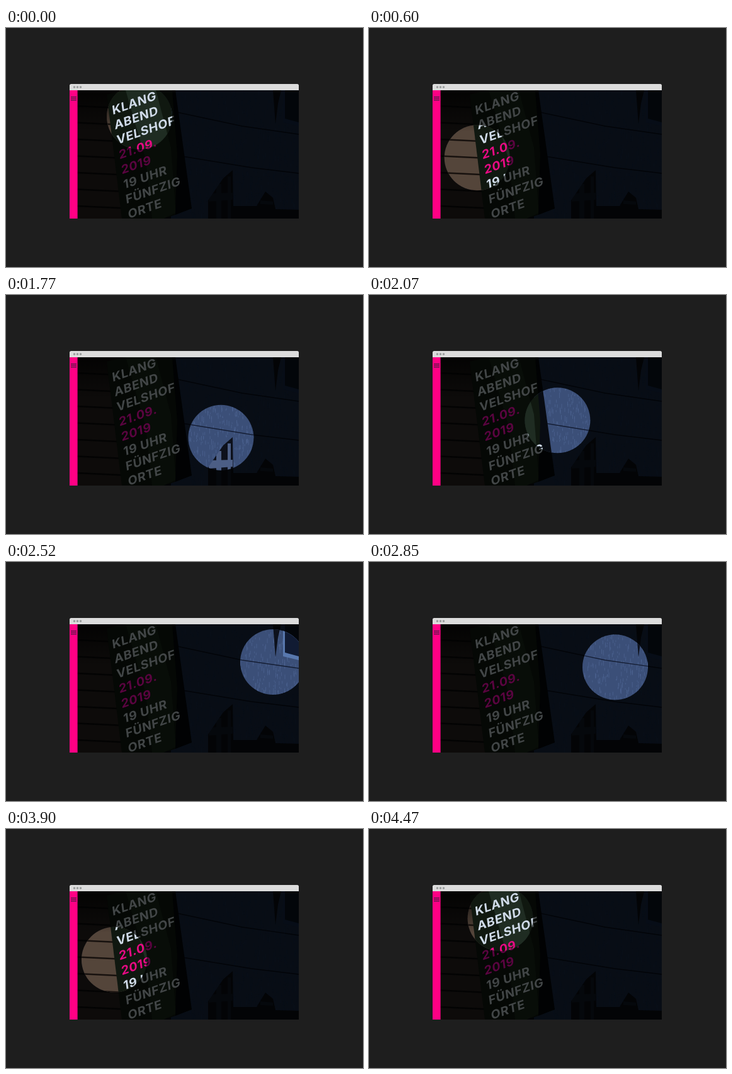
Write an HTML page that moves like this. It is 567x380 px and loops after 4500 ms.

```html
<!DOCTYPE html>
<html lang="de">
<head>
<meta charset="utf-8">
<title>Spotlight</title>
<style>
  html, body { margin: 0; width: 100%; height: 100%; overflow: hidden; background: #1e1e1e; }
  svg { display: block; }
  .dim {
    --wood: #0d0b0a; --gap: #030303; --wall: #080d15; --grain: #0a111a; --seam: #020408;
    --hole: #030406; --post: #05080c; --pane: #03060a; --frame: #070d17;
    --poster: #050805; --fold: #080d08; --edge: #010203; --text: #424647; --pink: #5a0440;
  }
  .lit {
    --wood: #54453a; --gap: #17110e; --wall: #3b4f78; --grain: #4f6694; --seam: #141d33;
    --hole: #0d111c; --post: #4c5e85; --pane: #111b33; --frame: #5878ae;
    --poster: #101810; --fold: #1f2c22; --edge: #080b12; --text: #d0dbe9; --pink: #e80a84;
  }
  .seam, .gap, .grain { fill: none; stroke: var(--seam); stroke-width: 1.3; }
  .gap { stroke: var(--gap); stroke-width: 2.6; }
  .grain { stroke: var(--grain); stroke-width: .7; }
  #lines { font: 700 19px Inter, Arial, sans-serif; letter-spacing: .03em; }
</style>
</head>
<body>
<svg width="567" height="380" viewBox="0 0 567 380">
  <defs>
    <clipPath id="photo"><path d="M113 99H465V303H113Z"/></clipPath>
    <clipPath id="spot"><circle id="light" r="52"/></clipPath>
    <clipPath id="boards">
      <path id="wall" d="M262 99H465V289L428 288 424 270 412 260 398 283 361 283 360 226 345 239 321 274V303H262Z"/>
    </clipPath>
    <linearGradient id="shade" x2="0" y2="1">
      <stop stop-opacity=".75"/><stop offset="1" stop-opacity="0"/>
    </linearGradient>
    <g id="scene">
      <path fill="var(--hole)" d="M113 99H465V303H113Z"/>
      <path fill="var(--wood)" d="M113 99H200V303H113Z"/>
      <path class="gap" id="planks"/>
      <path fill="url(#shade)" d="M113 99H200V165H113Z"/>
      <path fill="var(--post)" d="M322 263l38-1v11l-38 3zM334 248h8v55h-8zM352 236h5v67h-5zM404 274l20 2v5l-20-1z"/>
      <use href="#wall" fill="var(--wall)"/>
      <path class="grain" id="grain" clip-path="url(#boards)"/>
      <path class="seam" d="M272 134L375 156 465 169M280 204L390 222 465 231"/>
      <path fill="var(--hole)" d="M424 99H437L432 120 428 152Z"/>
      <path fill="var(--frame)" d="M440 99H465V156L440 150Z"/>
      <path fill="var(--pane)" d="M443 99H465V150L443 144Z"/>
      <path fill="var(--poster)" d="M160 106L188 99H268L294 287 266 298 250 303H184Z"/>
      <path fill="var(--fold)" d="M190 99L238 99 262 190 270 294 250 303 232 303 222 210Z"/>
      <path fill="var(--edge)" d="M264 99H269L295 287 269 297 272 200Z"/>
      <g id="lines"></g>
    </g>
  </defs>

  <rect width="567" height="380" fill="#1e1e1e"/>
  <path fill="#dcdcdc" d="M101 99V91.500a2.500 2.500 0 0 1 2.500-2.500H462.500a2.500 2.500 0 0 1 2.500 2.500V99Z"/>
  <path stroke="#999c9c" stroke-width="3.600" stroke-linecap="round" d="M108.500 94h0M113.500 94h0M118.500 94h0"/>
  <g clip-path="url(#photo)">
    <use href="#scene" class="dim"/>
    <g clip-path="url(#spot)"><use href="#scene" class="lit"/></g>
  </g>
  <path fill="#ff0084" d="M101 99H113.600V303H101Z"/>
  <path stroke="#4c1a44" stroke-width="1.200" d="M103 109.700h9M103 112.200h9M103 114.700h9"/>
</svg>
<script>
  const LOOP = 4500;
  const byId = id => document.getElementById(id);

  const lines = ['KLANG', 'ABEND', 'VELSHOF', '21.09.', '2019', '19 UHR', 'FÜNFZIG', 'ORTE'];
  lines.forEach((line, i) => {
    const el = document.createElementNS('http://www.w3.org/2000/svg', 'text');
    el.textContent = line;
    el.setAttribute('transform', `matrix(1 -.35 .13 1 ${169.5 + 3.6 * i} ${138 + 23.6 * i})`);
    el.setAttribute('fill', /^2/.test(line) ? 'var(--pink)' : 'var(--text)');
    byId('lines').append(el);
  });

  let planks = '';
  for (let y = 124; y < 303; y += 26.5) planks += `M113 ${y}l85 4`;
  byId('planks').setAttribute('d', planks);

  let seed = 7;
  const random = () => (seed = seed * 16807 % 2147483647) / 2147483647;
  let grain = '';
  for (let i = 0; i < 900; i++) {
    const x = 262 + random() * 203, y = 99 + random() * 204;
    grain += `M${x.toFixed(1)} ${y.toFixed(1)}v${(2 + random() * 7).toFixed(1)}`;
  }
  byId('grain').setAttribute('d', grain);

  // Turning points of the spotlight: time, x, y
  const path = [
    [0, 212, 141], [270, 383, 252], [525, 155, 195], [800, 280, 255], [1110, 411, 177],
    [1370, 213, 275], [1770, 341, 227], [1930, 420, 157], [2230, 155, 250], [2520, 424, 159],
    [2760, 410, 160], [3330, 225, 258], [3560, 410, 175], [3920, 170, 208], [4410, 196, 149],
    [LOOP, 212, 141]
  ];

  const rate = (i, k) => (path[i + 1][k] - path[i][k]) / (path[i + 1][0] - path[i][0]);

  // Monotone tangents keep the turning points from overshooting
  function tangent(i, k) {
    if (i === 0 || i === path.length - 1) return 0;
    const a = rate(i - 1, k), b = rate(i, k);
    return a * b > 0 ? 2 * a * b / (a + b) : 0;
  }

  function place(t, i, k) {
    const h = path[i + 1][0] - path[i][0], u = (t - path[i][0]) / h, v = 1 - u;
    return path[i][k] * v * v * (1 + 2 * u) + path[i + 1][k] * u * u * (3 - 2 * u)
      + h * u * v * (v * tangent(i, k) - u * tangent(i + 1, k));
  }

  const light = byId('light');
  function draw() {
    const t = performance.now() % LOOP;
    const i = path.findIndex(p => p[0] > t) - 1;
    light.setAttribute('cx', place(t, i, 1));
    light.setAttribute('cy', place(t, i, 2));
    requestAnimationFrame(draw);
  }
  draw();
</script>
</body>
</html>
```
